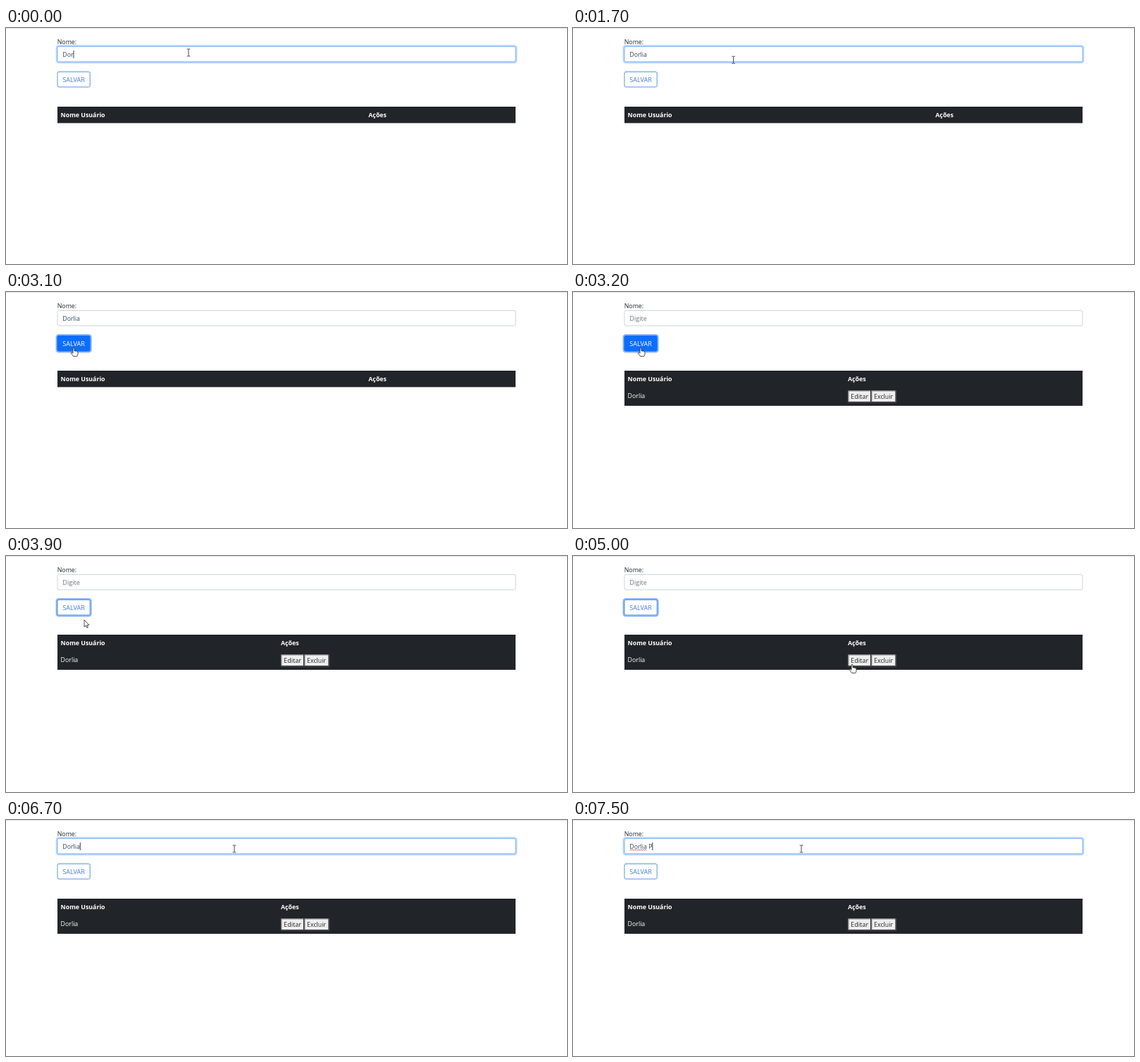
These frames come from a looping animation (796 by 336 pixels, 8 s). An HTML page:

```html
<!DOCTYPE html>
<html lang="pt">
<head>
<meta charset="utf-8">
<title>Cadastro</title>
<style>
  html, body { margin: 0; width: 100%; height: 100%; overflow: hidden; background: #fff; }
  svg { display: block; width: 796px; height: 336px; }
  text { font: 8.8px "Open Sans", "Noto Sans", sans-serif; fill: #212529; white-space: pre; }
  .caps { font-size: 9.1px; }
  .head { font-weight: 700; fill: #fff; }
  .light { fill: #fff; }
  .ring { fill: none; stroke: #0d6efd; stroke-width: 2.4; }
</style>
</head>
<body>
<svg viewBox="0 0 796 336">
  <path d="M0 .5H796" stroke="#dedede"/>
  <text x="72.7" y="22.7">Nome:</text>

  <rect x="73" y="26.5" width="650" height="21.5" rx="2" fill="#fff" stroke="#ced4da"/>
  <g id="focus">
    <rect class="ring" x="71.8" y="25.2" width="652.4" height="24" rx="3" stroke-opacity=".27"/>
    <rect x="73" y="26.5" width="650" height="21.5" rx="2" fill="#fff" stroke="#86b7fe"/>
  </g>
  <text id="hint" class="caps" x="80.3" y="40.7" style="fill:#6c757d">Digite</text>
  <text id="value" x="80.3" y="40.7" style="fill:#2f4458"></text>
  <path id="squiggle" fill="none" stroke="#e5484d" stroke-width=".9"/>
  <path id="caret" d="M0 32V43" stroke="#222" stroke-width=".9"/>

  <rect id="buttonRing" class="ring" x="71.8" y="61.2" width="48.6" height="24.2" rx="3" stroke-opacity=".5"/>
  <rect x="73" y="62.4" width="46.2" height="21.6" rx="2" fill="#fff" stroke="#4189dc" stroke-width=".9"/>
  <text class="caps" x="80.2" y="76.7" style="fill:#4579e2">SALVAR</text>
  <g id="buttonFill">
    <rect x="72.6" y="62" width="47" height="22.4" rx="2.3" fill="#0d6efd"/>
    <text class="caps light" x="80.2" y="76.7">SALVAR</text>
  </g>

  <rect id="table" x="73" y="112" width="650" fill="#212529"/>
  <text class="head" x="77.6" y="127.3">Nome Usuário</text>
  <text id="actions" class="head" y="127.3">Ações</text>
  <g id="row">
    <text class="light" x="77.6" y="150.6">Dorlia</text>
    <g id="rowButtons"></g>
  </g>

  <g id="pointer" stroke-linejoin="round">
    <path id="arrow" d="M0 0V10L2.3 7.9L3.9 11.3L5.4 10.6L3.9 7.3H7Z" fill="#fff" stroke="#222" stroke-width=".8"/>
    <path id="hand" d="M-1 1Q0 -.4 1 1V5Q2 4.2 2.8 5.3Q3.8 4.6 4.5 5.7Q6 5.3 6 6.8V9Q6 11 4.8 12.6H-.4L-3.6 8.2Q-4 6.8 -2.6 7L-1 8.2Z" fill="#fff" stroke="#222" stroke-width=".8"/>
    <path id="beam" d="M-2.3 -5H-.6L0 -4.5L.6 -5H2.3M0 -4.5V4.5M-2.3 5H-.6L0 4.5L.6 5H2.3" fill="none" stroke="#333" stroke-width=".9"/>
  </g>
</svg>
<script>
const LOOP = 8000, STEP = 100, NAME = "Dorlia", TEXT_X = 80.3;
const $ = id => document.getElementById(id);
const show = (id, on) => $(id).style.opacity = +on;
const ramp = (t, a, b) => Math.min(1, Math.max(0, (t - a) / (b - a)));
const within = (t, a, b) => t >= a && t < b;

// [time, x, y]
const path = [
  [1600, 259, 35], [1900, 165, 66], [2100, 120, 108], [2300, 99, 85], [2500, 96, 79],
  [3800, 96, 79], [3900, 111, 91], [4100, 200, 122], [4400, 296, 143],
  [4500, 296, 143], [4800, 375, 153], [5000, 396, 154], [5300, 398, 155],
  [5900, 398, 155], [6100, 350, 86], [6200, 329, 59], [6500, 325, 43], [6700, 324, 41]
];

// [time, input text]
const typing = [
  [0, NAME.slice(0, 3)], [100, NAME.slice(0, 4)], [500, NAME.slice(0, 5)], [1100, NAME],
  [3200, ""], [5500, NAME], [7200, NAME + " "], [7500, NAME + " P"]
];

function pointerAt(t) {
  const next = path.findIndex(k => k[0] > t);
  if (next === 0) return path[0].slice(1);
  if (next < 0) return path[path.length - 1].slice(1);
  const [a, b] = [path[next - 1], path[next]];
  const p = ramp(t, a[0], b[0]);
  return [a[1] + (b[1] - a[1]) * p, a[2] + (b[2] - a[2]) * p];
}

function pointerShape(x, y) {
  const inBox = (l, t, r, b) => x >= l && x <= r && y >= t && y <= b;
  if (inBox(73, 26, 723, 48)) return "beam";
  return inBox(73, 62, 119, 84) || inBox(390, 140, 458, 157) ? "hand" : "arrow";
}

function rowButton(x, width, label, size) {
  const r = x + width;
  return `<rect x="${x}" y="140.4" width="${width}" height="16.8" fill="#efefef"/>
    <path d="M${x + .5} 157V140.9H${r}" fill="none" stroke="#767676"/>
    <path d="M${x} 156.7H${r - .5}V140.4" fill="none" stroke="#1a1a1a"/>
    <text x="${x + 3.7}" y="152.2" style="font-size:${size}px">${label}</text>`;
}

function wave(width) {
  let d = `M${TEXT_X} 43.4`;
  for (let i = 1; i * 1.5 <= width; i++) d += `L${TEXT_X + i * 1.5} ${i % 2 ? 41.9 : 43.4}`;
  return d;
}

$("rowButtons").innerHTML = rowButton(390.4, 32.6, "Editar", 9.1) + rowButton(423.4, 35, "Excluir", 8.8);
$("value").textContent = NAME;
$("squiggle").setAttribute("d", wave($("value").getComputedTextLength()));

function draw(t) {
  const text = typing.filter(k => k[0] <= t).pop()[1];
  $("value").textContent = text;
  show("hint", !text);
  show("squiggle", within(t, 1800, 2800) || t >= 7500);

  const caretX = TEXT_X + (text ? $("value").getComputedTextLength() : 0) + .3;
  $("caret").setAttribute("transform", `translate(${caretX})`);
  show("caret", t < 1700 || t >= 6600);

  show("focus", 1 - ramp(t, 2700, 2800) + ramp(t, 6500, 6700));
  show("buttonRing", ramp(t, 2700, 2800) - ramp(t, 5100, 5300));
  show("buttonFill", ramp(t, 2300, 2500) - ramp(t, 3800, 3900));

  const saved = t >= 3200;
  show("row", saved);
  $("table").setAttribute("height", saved ? 50 : 23.4);
  $("actions").setAttribute("x", saved ? 390 : 514.3);

  const [x, y] = pointerAt(t), shape = pointerShape(x, y);
  $("pointer").setAttribute("transform", `translate(${x} ${y})`);
  for (const id of ["arrow", "hand", "beam"]) show(id, id === shape);
}

const start = performance.now();
function tick() {
  const t = (performance.now() - start) % LOOP;
  draw(Math.floor(t / STEP) * STEP);
  requestAnimationFrame(tick);
}
tick();
</script>
</body>
</html>
```
